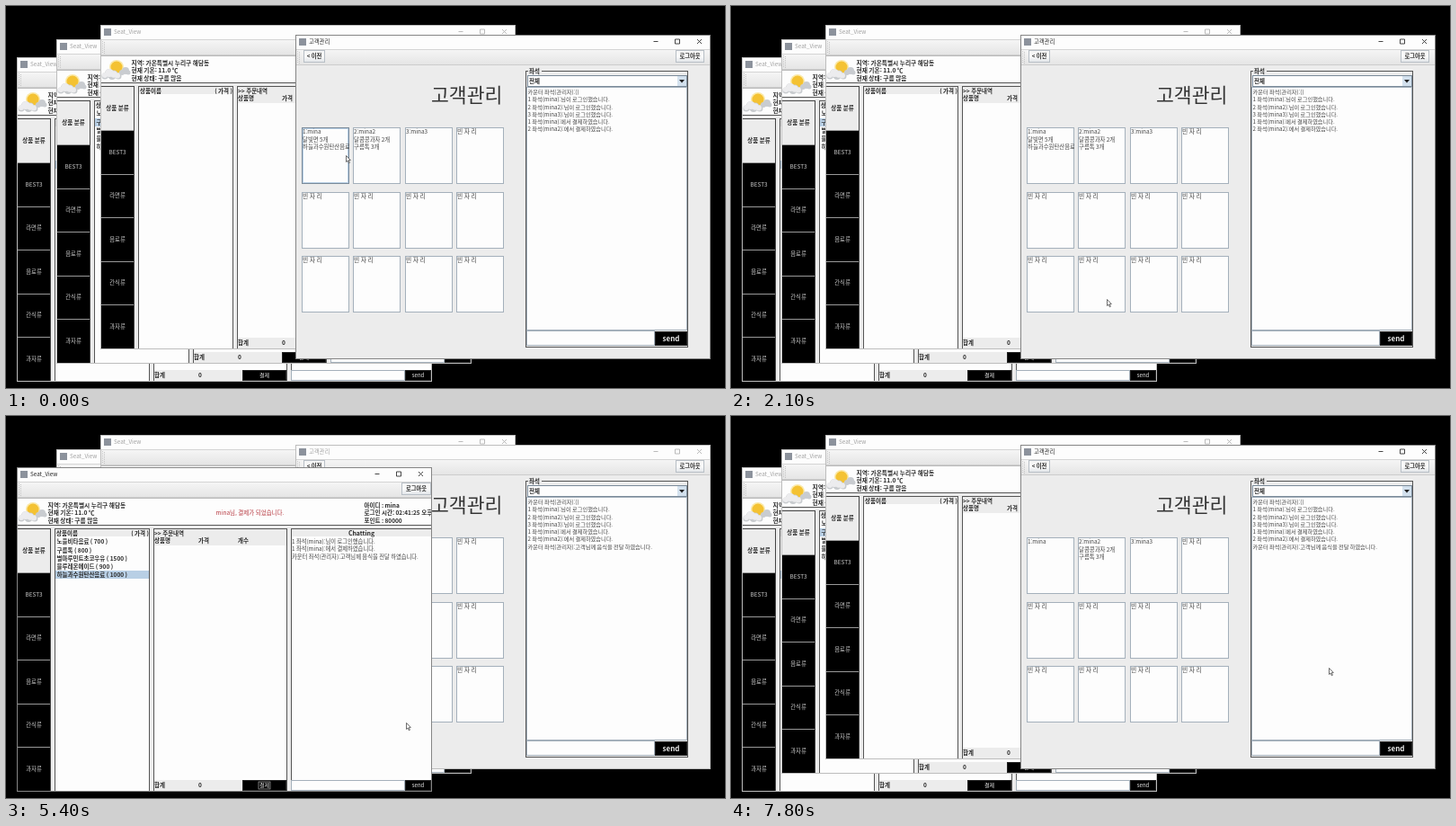
Write an HTML page with a canvas that moves like this. It is 800 px wide and 425 px high and loops after 8.4 s.

```html
<!DOCTYPE html>
<html lang="ko">
<head>
<meta charset="utf-8">
<title>Seat_View</title>
<style>
html, body { margin: 0; width: 100%; height: 100%; overflow: hidden; background: #000; }
canvas { display: block; width: 800px; height: 425px; }
</style>
</head>
<body>
<canvas id="stage"></canvas>
<script>
const LOOP = 8400;
const SANS = '"Noto Sans CJK KR", "Noto Sans CJK", "Noto Sans", sans-serif';
const GREY = '#ececec', WHITE = '#fdfdfd', BORDER = '#a4b0bb', INK = '#444';
const canvas = document.getElementById('stage');
const ctx = canvas.getContext('2d');
const ratio = window.devicePixelRatio || 1;
canvas.width = 800 * ratio;
canvas.height = 425 * ratio;

// Each step holds until the next one starts.
const FRONT = [[0, 3], [3600, 0], [6000, 1], [6600, 2], [7800, 3]];
const POINTER = [
  [0, [378, 166]], [300, [370, 171]], [600, [458, 305]], [900, [453, 306]],
  [1200, [426, 282]], [1500, [416, 321]], [1800, [418, 326]], [2400, [424, 333]],
  [2700, [429, 339]], [3000, [469, 405]], [5400, [445, 341]], [5700, null],
  [6900, [558, 304]], [7200, [665, 280]]
];
const HOVER = [[0, 0], [300, -1], [2400, 9], [2700, -1]];

const JOIN = [1, 2, 3].map(n => `${n} 좌석(${seatName(n)}):님이 로그인했습니다.`);
const PAID = [1, 2].map(n => `${n} 좌석(${seatName(n)}):에서 결제하였습니다.`);
const SERVED = '카운터 좌석(관리자):고객님께 음식을 전달 하였습니다.';
const MENU = ['노을비타음료 ( 700 )', '구름톡 ( 800 )', '별마루민트초코우유 ( 1500 )',
  '블루레몬에이드 ( 900 )', '하늘과수원탄산음료 ( 1000 )'];
const ORDERS = [['달빛면 5개', '하늘과수원탄산음료 2개'], ['달콤콩과자 2개', '구름톡 3개'], []];

const SEATS = [
  { x: 12, y: 57, n: 1, picked: 4, menu: MENU, time: '02:41:25', points: 80000, chat: [JOIN[0], PAID[0], SERVED] },
  { x: 56, y: 37, n: 2, picked: 1, menu: MENU, time: '02:41:25', points: 38650, chat: [JOIN[1], PAID[1]] },
  { x: 105, y: 21, n: 3, picked: -1, menu: [], time: '02:41:26', points: 50, chat: [JOIN[2]] }
];

function seatName(n) { return 'mina' + (n > 1 ? n : ''); }

function at(steps, t) {
  let value = steps[0][1];
  for (const [start, v] of steps) if (t >= start) value = v;
  return value;
}

function box(x, y, w, h, fill, edge) {
  if (edge) {
    ctx.fillStyle = edge;
    ctx.fillRect(x, y, w, h);
    x++; y++; w -= 2; h -= 2;
  }
  ctx.fillStyle = fill;
  ctx.fillRect(x, y, w, h);
}

// y is the vertical centre of the line.
function text(s, x, y, size = 6.3, color = INK, weight = 'normal', align = 'left') {
  ctx.font = `${weight} ${size}px ${SANS}`;
  ctx.fillStyle = color;
  ctx.textAlign = align;
  ctx.textBaseline = 'alphabetic';
  ctx.fillText(s, x, y + size * 0.36);
}

function bold(s, x, y, size = 6.5, align = 'left') {
  text(s, x, y, size, '#2a2a2a', 'bold', align);
}

function lines(list, x, y, step, size) {
  list.forEach((s, i) => text(s, x, y + i * step, size));
}

function blackButton(s, x, y, w, h, size = 6, edge = '#222', weight = 'normal') {
  box(x, y, w, h, '#000', edge);
  text(s, x + w / 2, y + h / 2, size, '#eee', weight, 'center');
}

function focusMark(x, y, w, h) {
  ctx.strokeStyle = '#aaa';
  ctx.lineWidth = 0.7;
  ctx.strokeRect(x - w / 2, y - h / 2, w, h);
}

function greyButton(s, x, y, w, h) {
  const shade = ctx.createLinearGradient(0, y, 0, y + h);
  shade.addColorStop(0, '#f4f4f4');
  shade.addColorStop(0.5, '#fafafa');
  shade.addColorStop(1, '#dfe3e7');
  box(x, y, w, h, shade, '#b8bfc6');
  bold(s, x + w / 2, y + h / 2, 6.3, 'center');
}

function frame(w, h, title, active) {
  box(0, 0, w, h, GREY);
  box(0, 0, w, 16, WHITE);
  box(4, 4, 8, 8, '#8c929c');
  text(title, 15, 8, 6.3, active ? '#222' : '#a0a0a0');
  ctx.strokeStyle = active ? '#333' : '#b4b4b4';
  ctx.lineWidth = 0.9;
  const x = w - 61, y = 7.5;
  ctx.beginPath();
  ctx.moveTo(x - 2.5, y); ctx.lineTo(x + 2.5, y);
  ctx.rect(x + 21.5, y - 2.5, 5, 5);
  ctx.moveTo(x + 46, y - 2.5); ctx.lineTo(x + 51, y + 2.5);
  ctx.moveTo(x + 51, y - 2.5); ctx.lineTo(x + 46, y + 2.5);
  ctx.stroke();
}

function outline(w, h, active) {
  ctx.strokeStyle = active ? '#858585' : '#bdbdbd';
  ctx.lineWidth = 1;
  ctx.strokeRect(0.5, 0.5, w - 1, h - 1);
}

function toolbar(w) {
  const shade = ctx.createLinearGradient(0, 16, 0, 34);
  shade.addColorStop(0, '#f6f6f6');
  shade.addColorStop(1, '#e4e4e4');
  box(0, 16, w, 18, shade);
  box(0, 16, w, 1, '#d4d4d4');
  box(0, 33, w, 1, '#ccc');
  for (let i = 0; i < 14; i++) box(2 + i % 2 * 2, 18 + i, 1, 1, '#c4c4c4');
}

function blobs(list, color) {
  ctx.fillStyle = color;
  for (const [x, y, r] of list) {
    ctx.beginPath();
    ctx.arc(x, y, r, 0, 7);
    ctx.fill();
  }
}

function weather() {
  blobs([[18, 47, 8]], '#fbe9a8');
  blobs([[18, 47, 6.5]], '#f4c232');
  blobs([[24, 53, 3], [28, 51, 4], [31, 53, 2.5]], '#c9ccd0');
  blobs([[5, 57, 3.5], [10, 54, 5], [15, 55, 4.5], [20, 57, 3.5], [13, 57, 4]], '#c8cbce');
  blobs([[5, 56, 3], [10, 53.5, 4.5], [15, 55, 3.8], [19, 56.5, 3]], '#ececee');
}

function seatWindow(seat, active) {
  const { n, picked } = seat;
  ctx.save();
  ctx.translate(seat.x, seat.y);
  ctx.beginPath();
  ctx.rect(0, 0, 462, 361);
  ctx.clip();
  frame(462, 361, 'Seat_View', active);
  toolbar(462);
  greyButton('로그아웃', 428, 17, 33, 14);

  box(0, 34, 462, 31, WHITE);
  box(0, 34, 462, 1, '#bbb');
  box(0, 64, 462, 1, '#555');
  weather();
  ['지역: 가온특별시 누리구 해담동', '현재 기온: 11.0 ℃', '현재 상태: 구름 많음']
    .forEach((s, i) => bold(s, 34.5, 42.8 + i * 8.2, 6.7));
  const note = picked < 0 ? '## 메시지' : `${seatName(n)}님, 결제가 되었습니다.`;
  text(note, 259.5, 50.3, 6.5, '#b5343c', picked < 0 ? 'bold' : 'normal', 'center');
  [`아이디 : ${seatName(n)}`, `로그인 시간: ${seat.time} 오후`, `포인트 : ${seat.points}`]
    .forEach((s, i) => bold(s, 386.5, 42.8 + i * 8.2));

  box(0, 68, 38, 293, '#000', '#444');
  box(1, 69, 36, 49, GREY);
  bold('상품 분류', 19, 93, 6.5, 'center');
  ['BEST3', '라면류', '음료류', '간식류', '과자류'].forEach((s, i) => {
    const y = 117 + i * 48.5;
    box(1, Math.round(y), 36, 1, '#999');
    text(s, 19, y + 24.5, 6.4, '#ccc', 'normal', 'center');
  });

  box(42, 68, 106, 293, WHITE, '#555');
  box(43, 69, 104, 8, GREY);
  bold('상품이름', 44, 73.5);
  bold('( 가격 )', 147, 73.5, 6.5, 'right');
  seat.menu.forEach((s, i) => {
    const y = 83 + i * 9.25;
    if (i === picked) box(43, Math.round(y - 4.6), 104, 9, '#b8cfe5');
    bold(s, 44.5, y);
  });

  box(152, 68, 149, 293, WHITE, '#555');
  box(153, 69, 147, 18, GREY);
  bold('>> 주문내역', 153, 73.5);
  bold('상품명', 153, 82);
  bold('가격', 202, 82);
  bold('개수', 246, 82);
  box(153, 348, 147, 12, GREY);
  bold('합계', 153, 354);
  bold('0', 202, 354);
  blackButton('결제', 251, 348, 49, 12);
  if (active && picked >= 0) focusMark(275.5, 354, 13, 8);

  box(305, 68, 157, 293, WHITE, '#555');
  box(306, 69, 155, 8, GREY);
  bold('Chatting', 383.5, 73.5, 6.9, 'center');
  lines(seat.chat, 306, 82.5, 8.4);
  box(305, 348, 127, 12, WHITE, BORDER);
  blackButton('send', 432, 348, 29, 12);
  outline(462, 361, active);
  ctx.restore();
}

function cell(i, t) {
  const x = Math.round(7 + i % 4 * 57.3), y = Math.round(103 + Math.floor(i / 4) * 71.5);
  const hover = at(HOVER, t) === i;
  box(x, y, 53, 63, hover ? '#b8cfe5' : WHITE, hover ? '#7a8a99' : BORDER);
  box(x + 2, y + 2, 49, 59, WHITE);
  ctx.save();
  ctx.beginPath();
  ctx.rect(x, y, 53, 63);
  ctx.clip();
  if (i > 2) {
    text('빈 자 리', x + 1, y + 5, 6.8);
  } else {
    const served = i === 0 && t >= 2400;
    lines([`${i + 1}:${seatName(i + 1)}`, ...(served ? [] : ORDERS[i])], x + 1, y + 5, 8.4, 6.4);
  }
  ctx.restore();
}

function managerWindow(t, active) {
  ctx.save();
  ctx.translate(322, 32);
  frame(462, 361, '고객관리', active);
  toolbar(462);
  greyButton('< 이전', 9, 17, 24, 14);
  greyButton('로그아웃', 423, 17, 32, 14);
  text('고객관리', 151, 67.5, 21.6, '#333');
  for (let i = 0; i < 12; i++) cell(i, t);

  box(256, 40, 181, 308, GREY, '#555');
  box(259, 36, 15, 8, GREY);
  bold('좌석', 260, 40.5, 6.4);
  box(258, 45, 178, 13, WHITE, '#7a8a99');
  bold('전체', 260, 51.5);
  box(425, 46, 10, 11, '#d3e1ee');
  ctx.fillStyle = '#222';
  ctx.beginPath();
  ctx.moveTo(427, 50); ctx.lineTo(433, 50); ctx.lineTo(430, 53.5);
  ctx.fill();
  box(257, 58, 179, 271, WHITE, BORDER);
  const log = ['카운터 좌석(관리자):()', ...JOIN, ...PAID];
  if (t >= 2400) log.push(SERVED);
  lines(log, 258.5, 64, 8.25, 6.2);
  box(257, 329, 143, 17, WHITE, BORDER);
  blackButton('send', 400, 330, 36, 16, 8, '#222', 'bold');
  outline(462, 361, active);
  ctx.restore();
}

function dialog(t) {
  ctx.save();
  ctx.translate(273, 81);
  frame(253, 257, '주문 목록', true);
  text('1:' + seatName(1), 127, 21.5, 11.5, '#333', 'normal', 'center');
  box(25, 37, 203, 183, WHITE);
  lines(ORDERS[0], 26, 41.5, 8.2);
  const pressed = t >= 1800;
  blackButton('로그아웃 시키기', 58, 241, 57, 13);
  blackButton('서비스 완료', 118, 241, 46, 13, 6, pressed ? '#9ab0c4' : '#222');
  if (pressed) focusMark(141, 247.5, 32, 8);
  blackButton('닫기', 167, 241, 29, 13);
  outline(253, 257, true);
  ctx.restore();
}

function pointer([x, y]) {
  ctx.save();
  ctx.translate(x + 0.5, y + 0.5);
  ctx.beginPath();
  [[0, 0], [0, 7], [1.6, 5.6], [2.8, 8.3], [3.9, 7.8], [2.8, 5.2], [4.8, 5]]
    .forEach(p => ctx.lineTo(...p));
  ctx.closePath();
  ctx.fillStyle = '#fff';
  ctx.fill();
  ctx.strokeStyle = '#333';
  ctx.lineWidth = 0.7;
  ctx.stroke();
  ctx.restore();
}

function draw(t) {
  ctx.setTransform(ratio, 0, 0, ratio, 0, 0);
  box(0, 0, 800, 425, '#000');
  const front = at(FRONT, t);
  const asking = t >= 300 && t < 2100;
  const blurred = asking || (t >= 3000 && t < 3600);
  for (let k = 1; k <= 4; k++) {
    const id = (front + k) % 4;
    const active = id === front && !blurred;
    if (id === 3) managerWindow(t, active);
    else seatWindow(SEATS[id], active);
  }
  if (asking) dialog(t);
  const tip = at(POINTER, t);
  if (tip) pointer(tip);
}

const begin = performance.now();
function tick() {
  draw((performance.now() - begin) % LOOP);
  requestAnimationFrame(tick);
}
tick();
</script>
</body>
</html>
```
